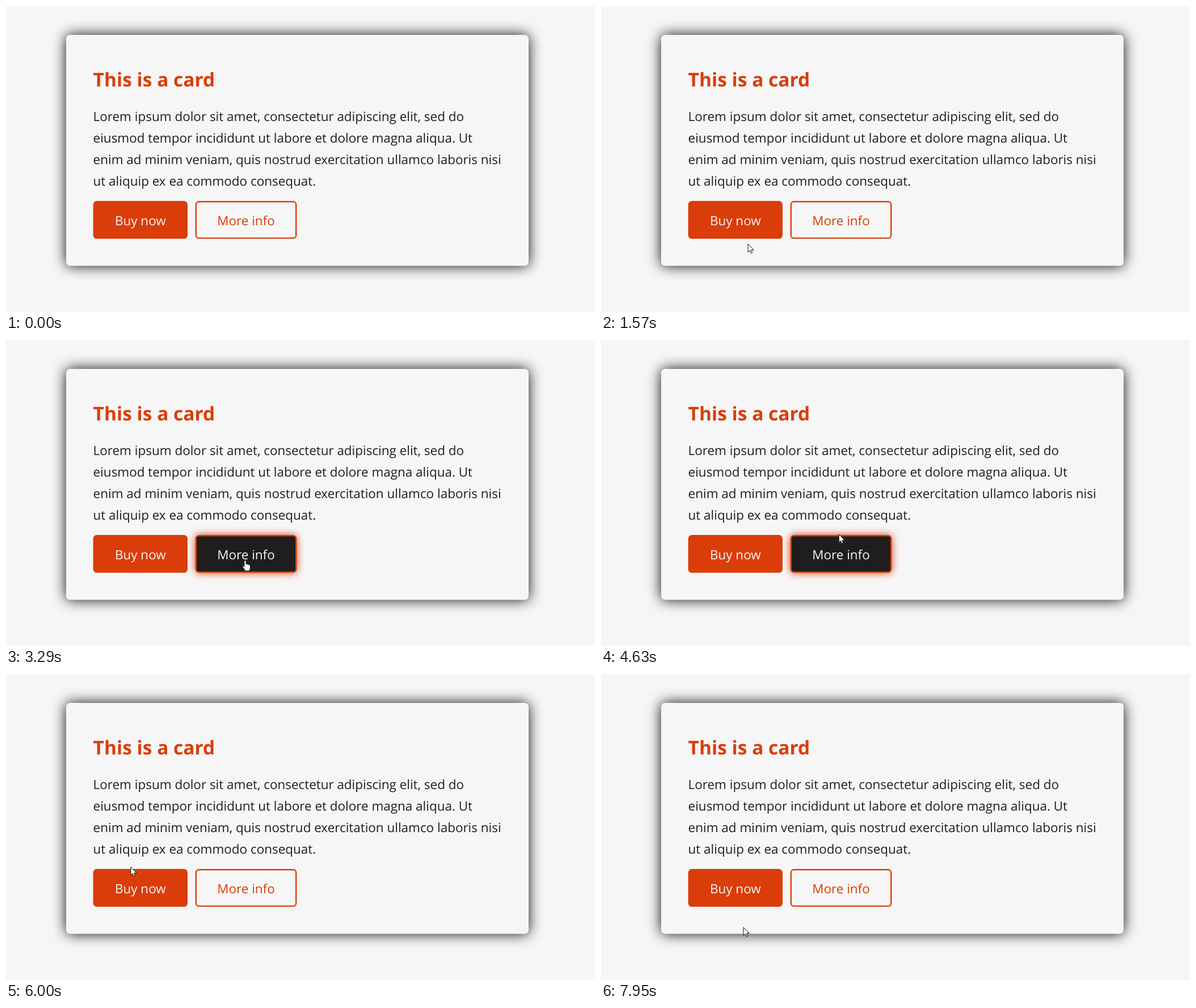
An HTML page with a canvas for the animation above (8000 ms loop, 1038 px wide and 540 px high).

```html
<!DOCTYPE html>
<html lang="en">
<head>
<meta charset="utf-8">
<title>Card with hover buttons</title>
<style>
  html, body { margin: 0; width: 100%; height: 100%; overflow: hidden; background: #f6f6f6; }
  canvas { display: block; }
</style>
</head>
<body>
<canvas id="stage" width="1038" height="540"></canvas>
<script>
const ctx = document.getElementById('stage').getContext('2d');
const LOOP = 8000, STEP = 68.7;
const PAPER = '#f6f6f6', ORANGE = '#da3d0a', INK = '#201d1e';
const FONT = '"Open Sans", "Noto Sans", sans-serif';
const LEFT = 153.6, TEXT = '22.45px';

const LINES = [
  'Lorem ipsum dolor sit amet, consectetur adipiscing elit, sed do',
  'eiusmod tempor incididunt ut labore et dolore magna aliqua. Ut',
  'enim ad minim veniam, quis nostrud exercitation ullamco laboris nisi',
  'ut aliquip ex ea commodo consequat.'
];

const BUTTONS = [
  { label: 'Buy now', x: LEFT, y: 344, w: 166.4, h: 66.8, solid: true },
  { label: 'More info', x: 333.6, y: 344, w: 178.8, h: 66.8, solid: false }
];

const point = (x, y) => ({ x, y });
const BUY = point(205, 386), MORE = point(421.5, 388.5), BACK = point(221, 386);

// Each move follows a Bezier curve through its control points; the pointer rests in between
const MOVES = [
  { from: 70, to: 500, curve: [point(236, 223), BUY, BUY] },
  { from: 1160, to: 3290, curve: [BUY, point(359, 480), point(385, 525), MORE] },
  { from: 4280, to: 6340, curve: [MORE, point(441, 228), point(190, 225), BACK] },
  { from: 7410, to: 7950, curve: [BACK, BACK, point(251, 447)] }
];

const ARROW = new Path2D('M0 0V14.5L3.3 11.5L5.5 16.3L7.8 15.2L5.6 10.6L10.2 10.4Z');
const HAND = new Path2D('M-1.6 1.5Q0 -1 1.6 1.5V7Q3 6 4.4 7.4Q6 6.8 6.9 8.4Q9 8 9 10.5V14' +
  'Q8.6 16.5 7.5 18V19H-.5V17.8Q-2 15 -4.4 12Q-5 10.2 -3.5 10Q-2.5 10 -1.6 11.5Z');

const ease = t => t + 0.66 * t * (1 - t) * (2 * t - 1);
const mix = (a, b, u) => point(a.x + (b.x - a.x) * u, a.y + (b.y - a.y) * u);

function bezier(points, u) {
  while (points.length > 1) {
    points = points.slice(1).map((p, i) => mix(points[i], p, u));
  }
  return points[0];
}

function pointerAt(t) {
  const move = MOVES.filter(m => m.from <= t).pop();
  if (!move) return null;
  const passed = Math.floor((t - move.from) / STEP + 0.25) * STEP;
  return bezier(move.curve, ease(Math.min(1, passed / (move.to - move.from))));
}

const inside = (p, b) =>
  p !== null && p.x >= b.x && p.x <= b.x + b.w && p.y >= b.y && p.y <= b.y + b.h;

function fillBox(x, y, w, h, r, color, glow, blur) {
  ctx.save();
  if (glow) {
    ctx.shadowColor = glow;
    ctx.shadowBlur = blur;
  }
  ctx.fillStyle = color;
  ctx.beginPath();
  ctx.roundRect(x, y, w, h, r);
  ctx.fill();
  ctx.restore();
}

function write(text, x, y, font, color, align = 'left') {
  ctx.font = font + ' ' + FONT;
  ctx.fillStyle = color;
  ctx.textAlign = align;
  ctx.fillText(text, x, y);
}

function drawButton(b, hot) {
  const edge = 2.4;
  fillBox(b.x, b.y, b.w, b.h, 6.5, ORANGE, hot && ORANGE, 14);
  if (hot || !b.solid) {
    fillBox(b.x + edge, b.y + edge, b.w - 2 * edge, b.h - 2 * edge, 4, hot ? INK : PAPER);
  }
  write(b.label, b.x + b.w / 2, 387, TEXT, hot || b.solid ? PAPER : ORANGE, 'center');
}

function drawPointer(p) {
  const shape = BUTTONS.some(b => inside(p, b)) ? HAND : ARROW;
  ctx.save();
  ctx.translate(p.x, p.y);
  ctx.fillStyle = '#fff';
  ctx.strokeStyle = '#111';
  ctx.lineJoin = 'round';
  ctx.fill(shape);
  ctx.stroke(shape);
  ctx.restore();
}

function draw(t) {
  const now = pointerAt(t);
  const late = pointerAt(t - STEP); // hover styling trails the pointer by one step

  ctx.textRendering = 'geometricPrecision';
  ctx.fillStyle = PAPER;
  ctx.fillRect(0, 0, 1038, 540);
  fillBox(106, 51, 815, 407.6, 7, PAPER, 'rgba(0, 0, 0, 0.95)', 25);
  write('This is a card', LEFT, 142, '700 33.5px', ORANGE);
  LINES.forEach((line, i) => write(line, LEFT, 203 + 38 * i, TEXT, INK));
  BUTTONS.forEach(b => drawButton(b, inside(late, b)));
  if (now) drawPointer(now);
}

const start = performance.now();
function tick() {
  draw((performance.now() - start) % LOOP);
  requestAnimationFrame(tick);
}
tick();
</script>
</body>
</html>
```
